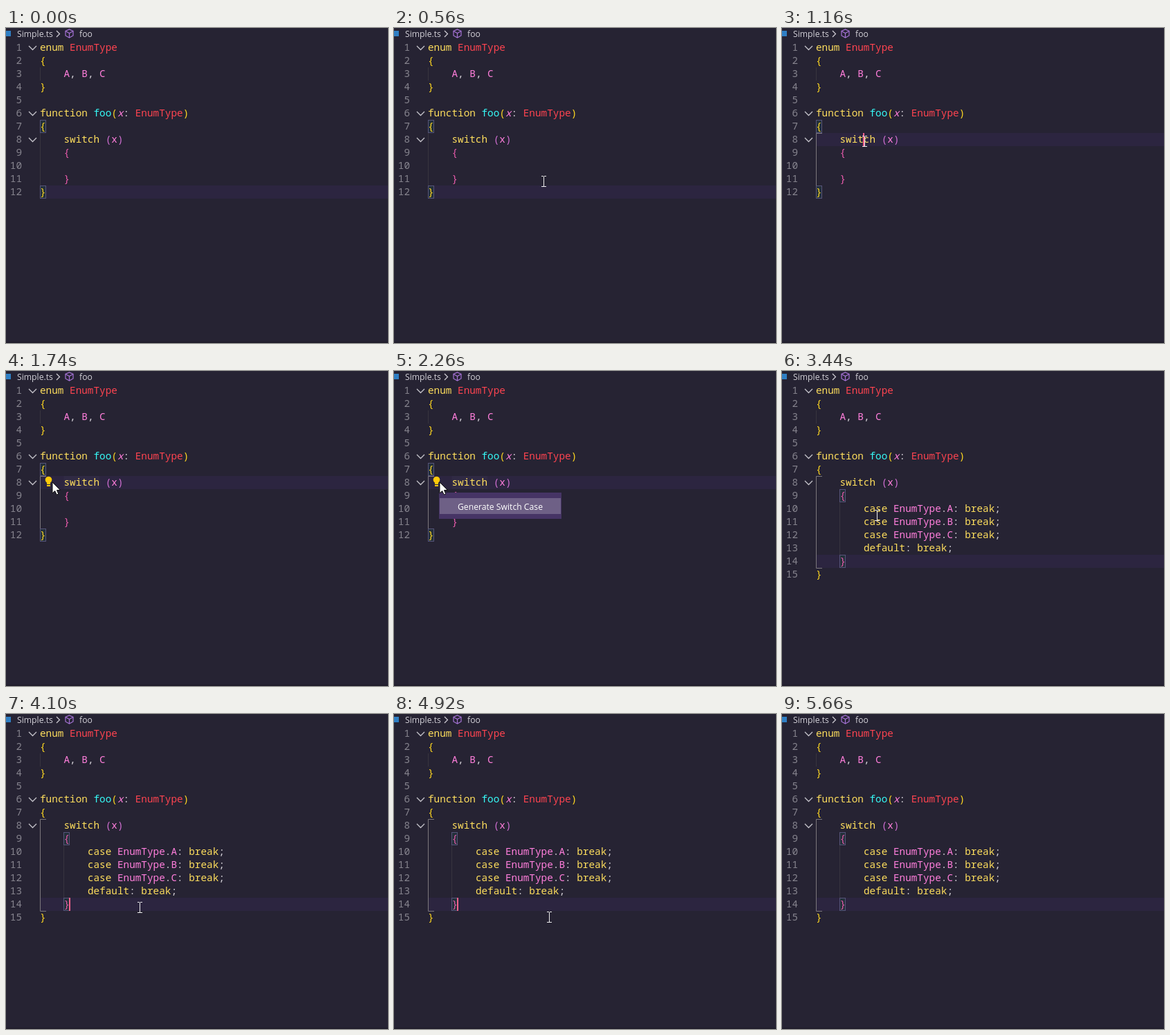
Animation, 552 px wide and 456 px high, one loop 5.72 s. Source, as an HTML page with a canvas:

```html
<!DOCTYPE html>
<html>
<head>
<meta charset="utf-8">
<style>
  html, body { margin: 0; width: 100%; height: 100%; overflow: hidden; background: #262333; }
  canvas { display: block; }
</style>
</head>
<body>
<canvas id="stage" width="552" height="456"></canvas>
<script>
const ctx = document.getElementById('stage').getContext('2d');
const LOOP = 5720, ROW = 19, COL = 8.61, LEFT = 49;
const CODE_FONT = '14.35px "Noto Sans Mono", "DejaVu Sans Mono", monospace';
const UI_FONT = '"Open Sans", "Noto Sans", sans-serif';
const YELLOW = '#fede5d', PINK = '#ff7edb', RED = '#fe4450', CYAN = '#36f9f6', GREY = '#d2cfd6';

const head = ['enum EnumType', '{', '    A, B, C', '}', '',
  'function foo(x: EnumType)', '{', '    switch (x)', '    {'];
const before = [...head, '', '    }', '}'];
const after = [...head,
  ...['A', 'B', 'C'].map(m => `        case EnumType.${m}: break;`),
  '        default: break;', '    }', '}'];

// Moments of the story, in ms
const CLICK_CODE = 930, BULB = 1300, CLICK_BULB = 1960, MENU = 2120, CLICK_ITEM = 2870, INSERT = 3170;

// Pointer path: time, x, y
const path = [
  [60, 302, 432], [340, 276, 318], [600, 205, 205], [880, 119, 164], [1380, 119, 164],
  [1780, 66, 161], [2330, 66, 161], [2800, 129, 197], [3300, 129, 199],
  [3950, 193, 280], [4250, 193, 280], [4700, 224, 294], [4950, 224, 294], [5240, 252, 470]
];

const lineTop = n => 19 + (n - 1) * ROW;
const colX = c => LEFT + c * COL;

function rect(x, y, w, h, color) {
  ctx.fillStyle = color;
  ctx.fillRect(x, y, w, h);
}

function text(s, x, y, color, font, align = 'left') {
  ctx.fillStyle = color;
  ctx.font = font;
  ctx.textAlign = align;
  ctx.fillText(s, x, y);
}

function stroke(points, color, width = 1) {
  ctx.beginPath();
  points.forEach(([x, y]) => ctx.lineTo(x, y));
  ctx.strokeStyle = color;
  ctx.lineWidth = width;
  ctx.stroke();
}

function disc(x, y, r, color) {
  ctx.beginPath();
  ctx.arc(x, y, r, 0, 7);
  ctx.fillStyle = color;
  ctx.fill();
}

function tokenColor(word, next) {
  if (/^(enum|function|switch|case|break|default)$/.test(word)) return YELLOW;
  if (word === 'EnumType' && next !== '.') return RED;
  if (word === 'foo') return CYAN;
  return /\w/.test(word) ? PINK : GREY;
}

function drawCode(lines) {
  let depth = 0;
  lines.forEach((line, i) => {
    const y = lineTop(i + 1) + 14;
    text(i + 1, 23, y, '#86848e', CODE_FONT, 'right');
    for (const m of line.matchAll(/\w+|[^\w\s]/g)) {
      const word = m[0], next = line[m.index + word.length];
      let color = tokenColor(word, next);
      if (')}'.includes(word)) depth--;
      if ('(){}'.includes(word)) color = depth ? (word < '{' ? '#d06fd2' : '#ec5cae') : '#ffd821';
      if ('({'.includes(word)) depth++;
      const italic = word === 'x' && next === ':' ? 'italic ' : '';
      text(word, colX(m.index), y, color, italic + CODE_FONT);
    }
  });
}

function drawBreadcrumb() {
  rect(0, 4, 7, 8, '#2f7fc4');
  const color = '#d3d1d8', font = '12.2px ' + UI_FONT;
  text('Simple.ts', 16, 13, color, font);
  stroke([[73, 4], [77.5, 8.5], [73, 13]], color, 1.2);
  text('foo', 106, 13, color, font);
  const cube = '#a673d6';
  stroke([[91.5, 2], [97, 4.5], [97, 11], [91.5, 14], [86, 11], [86, 4.5], [91.5, 2], [97, 4.5]], cube, 1.2);
  stroke([[86, 4.5], [91.5, 7.5], [97, 4.5]], cube, 1.2);
  stroke([[91.5, 7.5], [91.5, 14]], cube, 1.2);
}

function guide(col, from, to) {
  rect(colX(col) | 0, lineTop(from), 1, (to - from + 1) * ROW, '#37343f');
}

function bracketBox(col, line) {
  const x = Math.floor(colX(col)) + .5, y = lineTop(line) + .5;
  rect(x, y, 8, 18, '#24303a');
  ctx.strokeStyle = '#56547a';
  ctx.lineWidth = 1;
  ctx.strokeRect(x, y, 8, 18);
}

function drawMenu() {
  rect(65, 176, 177, 38, '#463465');
  rect(66, 184, 175, 23, '#6e6086');
  text('Generate Switch Case', 92, 201, '#ffffff', '12.2px ' + UI_FONT);
}

function drawBulb() {
  disc(61.5, 157.5, 4.8, '#ffc90a');
  rect(59, 160, 5, 4, '#ffc90a');
  rect(59, 165, 5, 2, '#ffc90a');
}

function pointerAt(t) {
  const i = path.findIndex(p => p[0] > t);
  if (i < 1) return null;
  const [t0, x0, y0] = path[i - 1], [t1, x1, y1] = path[i];
  let k = (t - t0) / (t1 - t0);
  if (i > 2) k = k * k * (3 - 2 * k);
  return [Math.round(x0 + (x1 - x0) * k), Math.round(y0 + (y1 - y0) * k)];
}

function drawPointer(t) {
  const p = pointerAt(t);
  if (!p) return;
  const [x, y] = p;
  const clicked = [CLICK_CODE, CLICK_BULB, CLICK_ITEM].some(c => t >= c && t < c + 180);
  if (clicked) disc(x - 1, y - 1, 12, 'rgba(222,205,35,.78)');
  if (t > 1700 && t < INSERT) {
    ctx.beginPath();
    [[0, 0], [0, 16], [3.7, 12.6], [6.2, 18], [8.8, 17], [6.5, 11.6], [11.3, 11.4]]
      .forEach(([dx, dy]) => ctx.lineTo(x + dx, y + dy));
    ctx.closePath();
    ctx.fillStyle = '#fff';
    ctx.fill();
    ctx.strokeStyle = '#111';
    ctx.lineWidth = 1;
    ctx.stroke();
  } else {
    rect(x, y - 7, 1, 15, '#eee');
    for (const dy of [-8, 7]) {
      rect(x - 3, y + dy, 3, 1, '#eee');
      rect(x + 1, y + dy, 3, 1, '#eee');
    }
  }
}

function draw(t) {
  const inserted = t >= INSERT, focused = t >= CLICK_CODE;
  const menu = t >= MENU && t < INSERT;
  const line = inserted ? 14 : focused ? 8 : 12;
  const last = inserted ? 15 : 12;

  rect(0, 0, 552, 456, '#262333');
  rect(0, 454, 552, 2, '#201d2b');
  rect(LEFT, lineTop(line), 503, ROW, '#2c2540');
  drawBreadcrumb();

  guide(0, 3, 3);
  guide(0, 8, last - 1);
  if (inserted) guide(4, 10, 13);
  if (focused) {
    const top = lineTop(8) + .5, bottom = lineTop(last) + .5;
    stroke([[58, top], [49.5, top], [49.5, bottom], [58, bottom]], '#7b777c');
  }
  const col = inserted ? 4 : 0;
  bracketBox(col, inserted ? 9 : 7);
  bracketBox(col, inserted ? 14 : 12);
  if (t >= BULB && !inserted) rect(colX(4), lineTop(8), 6 * COL, ROW, '#302a44');

  drawCode(inserted ? after : before);
  for (const n of [1, 6, 8]) {
    const y = lineTop(n) + 7;
    stroke([[33, y], [38.5, y + 5.5], [44, y]], '#c5c3ca', 1.3);
  }
  if (t >= BULB && !inserted) drawBulb();
  if (focused && !menu && (t + 100) % 1000 < 500) {
    rect(inserted ? 91 : 117, lineTop(line), 2, ROW, '#f2638c');
  }
  if (menu) drawMenu();
  drawPointer(t);
}

function tick() {
  draw(performance.now() % LOOP);
  requestAnimationFrame(tick);
}
tick();
</script>
</body>
</html>
```
